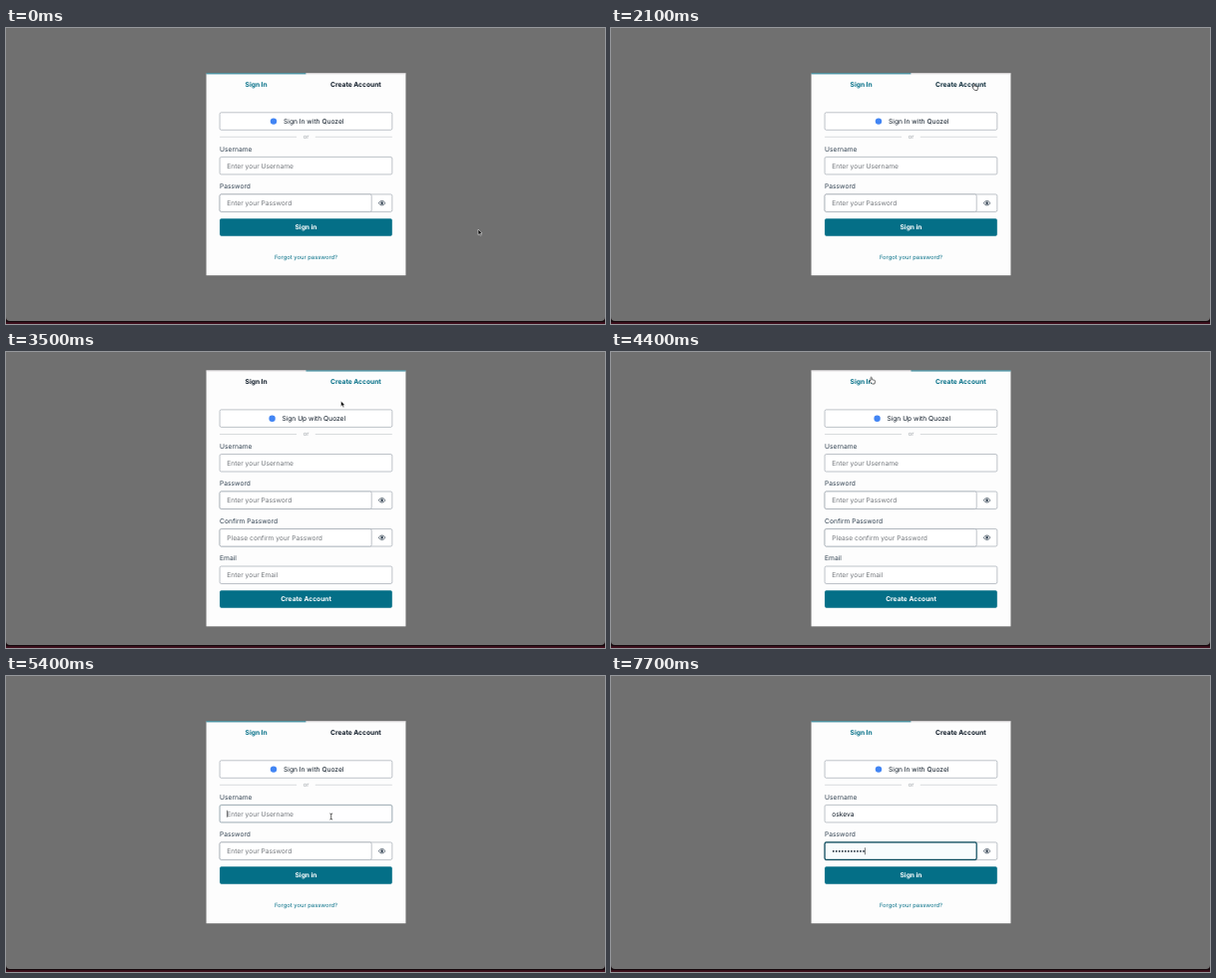
An HTML page for the animation above (8 s loop, 600 by 297 pixels).

```html
<!DOCTYPE html>
<html lang="en">
<head>
<meta charset="utf-8">
<title>Sign in</title>
<style>
  html, body { margin: 0; width: 100%; height: 100%; overflow: hidden; background: #707070; }
  svg { display: block; width: 100vw; height: 100vh; }
  text { font-family: Inter, sans-serif; font-size: 6.67px; text-rendering: geometricPrecision; white-space: pre; }
</style>
</head>
<body>
<svg id="stage" viewBox="0 0 600 297"></svg>
<script>
const LOOP = 8000, STEP = 100;
const TEAL = '#046f87', INK = '#0d1926', LABEL = '#304050', HINT = '#73777c', BORDER = '#929ba4', RING = '#07485a';
const USER = 'oskeva', BRAND = 'Quozel';
const LEFT = 214.1, WIDTH = 172.7, HEIGHT = 17.5, SPLIT = 366.2;

// When each thing happens, in ms
const HOVER_CREATE = 2050, SHOW_CREATE = 2400, HOVER_SIGNIN = 3800, SHOW_SIGNIN = 4450;
const FOCUS_USER = 5350, FOCUS_PASSWORD = 6500;
const KEY_TIMES = [5700, 5800, 6000, 6100, 6300, 6400];

// time, x, y of the pointer tip
const POINTER = [
  [0, 473, 202], [400, 473, 202], [900, 420, 130], [1300, 376, 88], [1800, 364, 70],
  [2000, 364, 70], [2100, 363, 55.5], [3400, 363, 55.5], [3700, 257, 31], [3800, 257, 31],
  [4400, 260, 25], [4500, 260, 25], [4700, 270, 50], [5000, 303, 205], [5300, 325.7, 141], [8000, 325.7, 141]
];

const clamp = v => Math.max(0, Math.min(1, v));
const fade = (t, start, length = 250) => clamp((t - start) / length);
const lerp = (a, b, k) => a + (b - a) * k;

function mix(a, b, k) {
  const channel = (c, i) => parseInt(c.slice(1 + 2 * i, 3 + 2 * i), 16);
  return `rgb(${[0, 1, 2].map(i => Math.round(lerp(channel(a, i), channel(b, i), k)))})`;
}

function pointerAt(t) {
  const i = Math.max(1, POINTER.findIndex(p => p[0] >= t));
  const [t0, x0, y0] = POINTER[i - 1], [t1, x1, y1] = POINTER[i];
  const k = clamp((t - t0) / (t1 - t0)), eased = k * k * (3 - 2 * k);
  return [lerp(x0, x1, eased), lerp(y0, y1, eased)];
}

const rect = (x, y, w, h, fill, extra = '') =>
  `<rect x="${x}" y="${y}" width="${w}" height="${h}" fill="${fill}" ${extra}/>`;
const text = (x, y, content, fill, extra = '') =>
  `<text x="${x}" y="${y}" fill="${fill}" ${extra}>${content}</text>`;
const centered = (x, y, content, fill, extra = '') =>
  text(x, y, content, fill, 'text-anchor="middle" ' + extra);
const box = (y, w = WIDTH, stroke = BORDER, weight = 0.6, fill = '#fff') =>
  rect(LEFT, y, w, HEIGHT, fill, `rx="1.6" stroke="${stroke}" stroke-width="${weight}"`);
const caret = x => rect(x, -3.4, 0.5, 7, '#000');

function eye(y) {
  return `<g transform="translate(376.6 ${y})" fill="none" stroke="${LABEL}" stroke-width=".75">
    <path d="M-3.4 0Q0-4.5 3.4 0Q0 4.5-3.4 0Z"/><circle r="1" fill="${LABEL}"/></g>`;
}

function field(y, label, hint, { value = '', dots = 0, focus = 0, secret = false } = {}) {
  const mid = y + HEIGHT / 2, w = secret ? SPLIT - LEFT : WIDTH;
  let out = text(LEFT, y - 5.8, label, LABEL);
  if (secret) out += box(y) + eye(mid);
  out += box(y, w, mix(BORDER, RING, focus), lerp(0.6, 1.2, focus), mix('#ffffff', '#f8fcfd', focus));
  let content = value || dots ? text(221.3, 2.4, value, INK) : text(221.3, 2.4, hint, HINT);
  for (let i = 0; i < dots; i++) content += `<circle cx="${222.8 + i * 3.02}" cy=".2" r=".9" fill="${INK}"/>`;
  if (focus && !value) content += caret(221.2 + dots * 3.02);
  return out + `<g transform="translate(0 ${mid})">${content}</g>`;
}

function submit(y, label) {
  return rect(LEFT, y, WIDTH, HEIGHT, TEAL, 'rx="1.6"') +
    centered(300.5, y + 11.15, label, '#fff', 'font-weight="700"');
}

function header(top, action, iconX, textX, signIn, create, signInLine, createLine) {
  const y = top + 39.4;
  return rect(200.6, top, 99.9, 0.9, mix('#ded9dd', TEAL, signInLine)) +
    rect(300.5, top, 99.9, 0.9, mix('#ded9dd', TEAL, createLine)) +
    centered(250.6, top + 13.4, 'Sign In', mix(INK, TEAL, signIn), 'font-weight="700"') +
    centered(350.4, top + 13.4, 'Create Account', mix(INK, TEAL, create), 'font-weight="700"') +
    box(y) + `<circle cx="${iconX}" cy="${y + 8.8}" r="3.2" fill="#4285f4"/>` +
    text(textX, y + 11.15, `${action} with ${BRAND}`, INK) +
    rect(LEFT, top + 63.5, 77, 0.5, '#b3b8bd') + rect(309.8, top + 63.5, 77, 0.5, '#b3b8bd') +
    centered(300.5, top + 65.3, 'or', '#999fa5', 'style="font-size:5.83px"');
}

function signInPanel(t) {
  const back = t >= SHOW_SIGNIN, away = fade(t, SHOW_SIGNIN + 50);
  const create = back ? 1 - away : fade(t, HOVER_CREATE);
  const typed = KEY_TIMES.filter(k => k <= t).length;
  const dots = Math.max(0, Math.min(11, Math.floor((t - 6600) / 100)));
  const userFocus = t >= FOCUS_PASSWORD ? 0 : fade(t, FOCUS_USER);
  return rect(200.6, 45.4, 199.8, 202.8, '#fdfdfd') +
    header(45.4, 'Sign In', 268, 278, 1, create, 1, back ? 1 - away : 0) +
    field(129.4, 'Username', 'Enter your Username', { value: USER.slice(0, typed), focus: userFocus }) +
    field(166.9, 'Password', 'Enter your Password', { dots, focus: fade(t, FOCUS_PASSWORD), secret: true }) +
    submit(191.2, 'Sign in') +
    centered(300.5, 231.5, 'Forgot your password?', TEAL, 'style="font-size:5.83px"');
}

function createPanel(t) {
  const away = fade(t, SHOW_CREATE), hover = fade(t, HOVER_SIGNIN);
  return rect(200.6, 18.5, 199.8, 256.8, '#fdfdfd') +
    header(18.5, 'Sign Up', 266.6, 276.4, Math.max(1 - away, hover), 1, 1 - away, 1) +
    field(102.5, 'Username', 'Enter your Username') +
    field(140, 'Password', 'Enter your Password', { secret: true }) +
    field(177.5, 'Confirm Password', 'Please confirm your Password', { secret: true }) +
    field(215, 'Email', 'Enter your Email') +
    submit(239.2, 'Create Account');
}

const SHAPES = {
  arrow: '<path d="M0 0V5.6L1.3 4.4L2.2 6.4L3.2 6L2.3 4H4Z" fill="#000" stroke="#fff" stroke-width=".5"/>',
  hand: '<path d="M0 .7Q.7-.4 1.3.7V2.7L4 3.3Q4.8 3.6 4.6 4.6L4 7H1.4L-.9 4.3Q-.9 3.3 0 3.8Z" fill="#fff" stroke="#111" stroke-width=".6"/>',
  beam: '<path d="M-1.4-3Q0-3 0-2.2Q0-3 1.4-3M0-2.2V2.2M-1.4 3Q0 3 0 2.2Q0 3 1.4 3" fill="none" stroke="#111" stroke-width=".65"/>'
};

function pointer(t) {
  if (t >= KEY_TIMES[0]) return '';
  const [x, y] = pointerAt(t);
  const overTab = (t >= HOVER_CREATE && t < SHOW_CREATE + 100) || (t >= 3700 && t < SHOW_SIGNIN);
  const shape = overTab ? 'hand' : t >= 5200 ? 'beam' : 'arrow';
  return `<g transform="translate(${x} ${y})">${SHAPES[shape]}</g>`;
}

function draw(t) {
  const creating = t >= SHOW_CREATE && t < SHOW_SIGNIN;
  return rect(0, 0, 600, 297, '#16090d') + rect(0, 295.3, 600, 1.7, '#42101f') +
    '<path d="M0 0H600V290Q600 294 596 294H4Q0 294 0 290Z" fill="#707070"/>' +
    (creating ? createPanel(t) : signInPanel(t)) + pointer(t);
}

const stage = document.getElementById('stage');
let shown = -1;
function tick() {
  const t = Math.floor(performance.now() % LOOP / STEP) * STEP;
  if (t !== shown) stage.innerHTML = draw(shown = t);
  requestAnimationFrame(tick);
}
tick();
</script>
</body>
</html>
```
